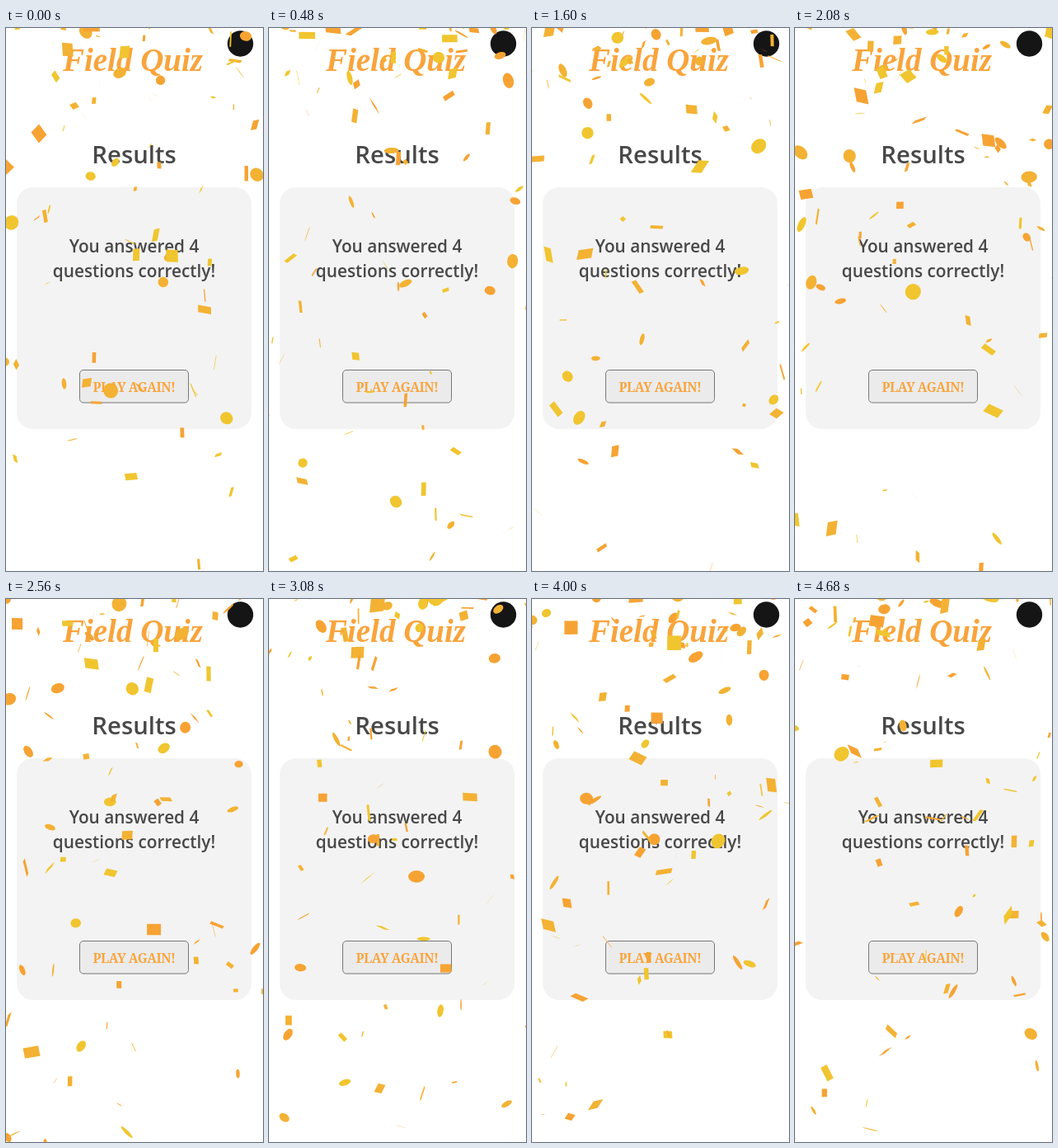
Animation of 312 by 658 pixels, one loop 4.72 s. Source, as an HTML page:

```html
<!DOCTYPE html>
<html lang="en">
<head>
<meta charset="utf-8">
<title>Quiz results</title>
<style>
  html, body { margin: 0; width: 100%; height: 100%; overflow: hidden; background: #fff; }
  svg { display: block; width: 312px; height: 658px; }
  text { text-anchor: middle; fill: #484848; font-family: "Open Sans", "Noto Sans", sans-serif; font-weight: 600; }
  .brand { fill: #f9a43c; font: italic bold 39px "Liberation Serif", serif; }
  .action { fill: #f9a43c; font: bold 15.6px "Noto Serif", serif; letter-spacing: -0.5px; }
</style>
</head>
<body>
<svg viewBox="0 0 312 658" xmlns="http://www.w3.org/2000/svg">
  <rect width="312" height="658" fill="#fff"/>
  <text class="brand" x="154" y="52">Field Quiz</text>
  <circle cx="284.5" cy="19" r="15.7" fill="#151515"/>
  <text x="155.5" y="164" font-size="29.3">Results</text>
  <rect x="13" y="193" width="285" height="293" rx="20" fill="#f3f3f3"/>
  <text x="155.5" y="272" font-size="20.8">You answered 4</text>
  <text x="155.5" y="301.5" font-size="20.8">questions correctly!</text>
  <rect x="89.5" y="414.5" width="132" height="39.5" rx="4.5" fill="#ebebeb" stroke="#777"/>
  <text class="action" x="155.5" y="441">PLAY AGAIN!</text>
  <g id="confetti"></g>
</svg>
<script>
const W = 312, H = 658, LOOP = 4720, STEP = 40;
const TICK = 10, LAST = LOOP / TICK;
const SLOTS = 170, DRAG = 0.99, TERMINAL = 9.9, MARGIN = 100;
const COLORS = ["#f6a333", "#f3b233", "#f0c52f"];
const layer = document.getElementById("confetti");

let seed = 20417;
function random() {
  seed = (seed + 0x6d2b79f5) | 0;
  let t = Math.imul(seed ^ (seed >>> 15), 1 | seed);
  t = (t + Math.imul(t ^ (t >>> 7), 61 | t)) ^ t;
  return ((t ^ (t >>> 14)) >>> 0) / 4294967296;
}
const range = (a, b) => a + (b - a) * random();
const pick = n => Math.floor(random() * n);

function makePiece(birth) {
  return {
    birth,
    x: range(0, W), vx: range(-4, 4), vy: range(-10, 0),
    angle: range(0, 360), spin: range(-11.5, 11.5),
    flip: range(0, 4),
    shape: pick(3), color: COLORS[pick(3)],
    w: range(5, 20), h: range(5, 20), r: range(5, 10)
  };
}

// Launch upward, then fall under gravity with drag; n counts ticks since birth.
function place(p, n) {
  const slow = (1 - DRAG ** n) / (1 - DRAG);
  return [p.x + p.vx * slow, TERMINAL * n + (p.vy - TERMINAL) * slow];
}

function lifeOf(p) {
  for (let n = 1; ; n++) {
    const [x, y] = place(p, n);
    if (y > H + 10 || y < -MARGIN || x < -MARGIN || x > W + MARGIN) return n;
  }
}

function addShape(p) {
  const round = p.shape === 0;
  const el = document.createElementNS(layer.namespaceURI, round ? "circle" : "rect");
  const width = p.shape === 1 ? p.w : p.w / 3;
  const attrs = round
    ? { r: p.r }
    : { x: -width / 2, y: -p.h / 2, width, height: p.h };
  attrs.fill = p.color;
  for (const key in attrs) el.setAttribute(key, attrs[key]);
  p.el = layer.appendChild(el);
}

// Each slot throws a new piece as soon as its last one leaves.
const pieces = [];
for (let i = 0; i < SLOTS; i++) {
  let birth = -range(400, 600);
  while (birth < LAST) {
    const p = makePiece(birth);
    p.life = lifeOf(p);
    birth += p.life;
    if (birth > 0) {
      addShape(p);
      pieces.push(p);
    }
  }
}

// Turning before and after the flattening shears the rectangles.
function draw(ms) {
  const now = ms / TICK;
  for (const p of pieces) {
    const n = now - p.birth;
    if (n < 0 || n >= p.life) {
      p.el.setAttribute("display", "none");
      continue;
    }
    const [x, y] = place(p, n);
    const turn = `rotate(${(p.angle + p.spin * n).toFixed(1)})`;
    const flat = Math.abs((p.flip + n * 0.1) % 4 - 2) - 1;
    p.el.removeAttribute("display");
    p.el.setAttribute("transform",
      `translate(${x.toFixed(2)} ${y.toFixed(2)}) ${turn} scale(1 ${flat.toFixed(3)}) ${turn}`);
  }
}

const start = performance.now();
function frame() {
  const ms = (performance.now() - start) % LOOP;
  draw(Math.floor(ms / STEP) * STEP);
  requestAnimationFrame(frame);
}
draw(0);
requestAnimationFrame(frame);
</script>
</body>
</html>
```
